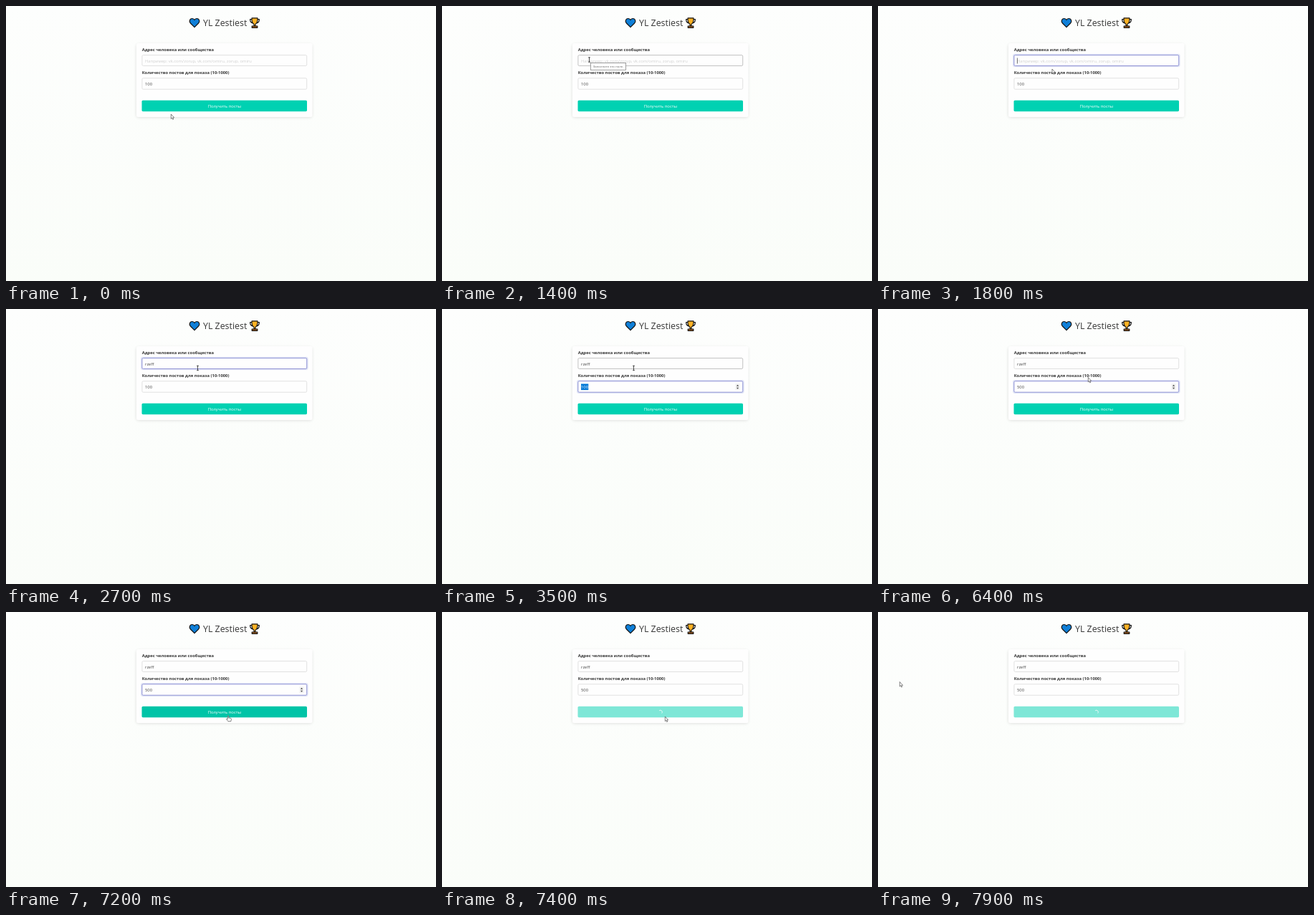
These frames come from a looping animation (600x384 px, 8 s). An HTML page:

```html
<!DOCTYPE html>
<html lang="ru">
<head>
<meta charset="utf-8">
<title>YL Zestiest</title>
<style>
html, body { margin: 0; width: 100%; height: 100%; overflow: hidden; background: #fbfdfa; }
svg { display: block; width: 600px; height: 384px; }
text { font: 5.85px "Open Sans", "Noto Sans", sans-serif; fill: #484848; white-space: pre; }
.title { font-size: 12.4px; font-weight: 500; fill: #363636; }
.label { font-weight: 700; fill: #363636; }
.hint { fill: #d0d0d0; }
.tip { font-size: 4.3px; fill: #666; }
.field { fill: #fefefe; stroke: #dedede; stroke-width: .9; }
.hot { stroke: #bcbcbc; }
.focus { stroke: #8689d2; }
.ring { fill: none; stroke: #485fc7; stroke-opacity: .16; stroke-width: 2; }
.caret { stroke: #333; stroke-width: .7; }
.ink { stroke: #151515; stroke-width: 1.2; stroke-linejoin: round; }
.pointer { fill: #fff; stroke: #444; stroke-width: .65; stroke-linejoin: round; }
</style>
</head>
<body>
<svg viewBox="0 0 600 384">
  <defs>
    <linearGradient id="sky" x2="0" y2="1"><stop stop-color="#fdfefd"/><stop offset="1" stop-color="#fafdf9"/></linearGradient>
    <filter id="soft" x="-10%" y="-20%" width="120%" height="140%"><feGaussianBlur stdDeviation="2.2"/></filter>
  </defs>
  <rect width="600" height="384" fill="url(#sky)"/>

  <path class="ink" fill="#0f7fd8" d="M263 29.7 257.4 24C254.6 20.7 257 17.4 259.9 17.5 261.6 17.6 262.6 18.6 263 19.6 263.4 18.6 264.4 17.6 266.1 17.5 269 17.4 271.4 20.7 268.6 24Z"/>
  <text class="title" x="275" y="28">YL Zestiest</text>
  <g class="ink">
    <path fill="none" d="M343.3 18.6H340.6C340.6 21.8 341.8 23.6 344.6 24M350.7 18.6H353.4C353.4 21.8 352.2 23.6 349.4 24"/>
    <path fill="#ffb224" d="M343 16.8H351C351.2 21.6 350 24.4 348 25.2V27.6H346V25.2C344 24.4 342.8 21.6 343 16.8Z"/>
    <path fill="#b5651d" d="M343.2 30.3V28H350.8V30.3Z"/>
  </g>

  <rect x="182" y="53.5" width="245" height="102" rx="3" fill="#0a0a0a" opacity=".13" filter="url(#soft)"/>
  <rect x="182" y="52" width="245.5" height="103" rx="2.5" fill="#fefefe"/>
  <text class="label" x="189.7" y="63">Адрес человека или сообщества</text>
  <text class="label" x="189.7" y="95.4">Количество постов для показа (10-1000)</text>

  <rect id="ring1" class="ring" x="189" y="67.8" width="231.6" height="16.4" rx="2.2"/>
  <rect id="box1" x="189.9" y="68.6" width="229.8" height="14.9" rx="1.6"/>
  <text id="hint" class="hint" x="194" y="78.8">Например: vk.com/zorup, vk.com/omiru, zorup, omiru</text>
  <text id="text1" x="194" y="78.8"></text>

  <rect id="ring2" class="ring" x="189" y="100" width="231.6" height="16.9" rx="2.2"/>
  <rect id="box2" x="189.9" y="100.8" width="229.8" height="15.4" rx="1.6"/>
  <rect id="mark" x="194" y="104.5" width="10.3" height="8.6" fill="#0078d7"/>
  <text id="text2" x="194" y="111.2"></text>
  <g id="steps">
    <rect x="409.5" y="104.3" width="6" height="9" fill="#f0f0f0"/>
    <path fill="#444" d="M410.9 107.8 412.5 105.8 414.1 107.8ZM410.9 109.8H414.1L412.5 111.8Z"/>
  </g>
  <path id="caret" class="caret"/>

  <g id="button">
    <rect id="face" x="189.5" y="131.8" width="230.5" height="15.4" rx="1.6"/>
    <text id="send" x="304.8" y="141.8" text-anchor="middle" style="fill:#fff">Получить посты</text>
    <path id="spin" d="M302.9 137.6A2.6 2.6 0 0 0 306.5 141.3" fill="none" stroke="#fff" stroke-width=".8"/>
  </g>

  <g id="tip">
    <rect x="207.5" y="79.5" width="49" height="9.8" fill="#fff" stroke="#858585" stroke-width=".8"/>
    <text class="tip" x="210.8" y="86">Заполните это поле.</text>
  </g>

  <g id="cursor">
    <path id="arrow" class="pointer" d="M.3 0V6.5L1.7 5.2 2.7 7.5 3.7 7 2.7 4.8H4.6Z"/>
    <path id="beam" fill="none" stroke="#222" stroke-width=".8" d="M-1.4-3.2H1.4M0-3.2V3.2M-1.4 3.2H1.4"/>
    <path id="hand" class="pointer" d="M-.7.6Q0-.4.7.6V3.2L3.8 4Q4.6 4.3 4.4 5.3L3.8 8.2H-.1L-2.4 5.2Q-2.4 4.2-1.5 4.6L-.7 5.3Z"/>
  </g>
</svg>
<script>
const $ = id => document.getElementById(id);
const LOOP = 8000, STEP = 100, BLINK = 450, LOAD = 7400;

// time, x, y
const path = [
  [0, 230, 151], [200, 224, 125], [400, 210, 88], [600, 205.5, 75], [1400, 205.5, 75],
  [1700, 232, 90], [2000, 264, 84], [2100, 267.5, 82.5], [6300, 267.5, 82.5],
  [6400, 293, 95.5], [6500, 303, 196], [6600, 303, 196], [6800, 307, 166],
  [7000, 310, 144.5], [7300, 310, 144.5], [7400, 311, 146], [7500, 312, 158],
  [7600, 215, 135], [7700, 80, 110], [7800, 16, 100], [7900, 30, 97.5]
];
// time of key press, value
const name = [[0, ""], [2100, "rz"], [2200, "rzef"], [2250, "rzeff"]];
const count = [[0, "100"], [3700, "5"], [4300, "50"], [4800, "500"]];

const last = (list, t) => list.filter(k => k[0] <= t).pop();
const show = (id, on) => $(id).style.display = on ? "" : "none";

function place(t) {
  const i = path.findIndex(p => p[0] > t);
  if (i < 0) return path[path.length - 1].slice(1);
  const [t0, x0, y0] = path[i - 1], [t1, x1, y1] = path[i];
  const k = (t - t0) / (t1 - t0);
  return [x0 + (x1 - x0) * k, y0 + (y1 - y0) * k];
}

function draw(now) {
  const t = Math.floor(now % LOOP / STEP) * STEP;
  const [x, y] = place(t);
  const inside = (top, bottom) => x > 189 && x < 420 && y > top && y < bottom;
  const loading = t >= LOAD;
  const focus = t < 1500 || loading ? 0 : t < 2900 ? 1 : 2;
  const over = !loading && inside(132, 147);
  const beam = inside(68, 84) || inside(100, 117);

  const keys = [name, count].map(list => last(list, t));
  keys.forEach(([, value], i) => {
    const n = i + 1, hot = n === 1 && t >= 1300 && t < 6400;
    $("text" + n).textContent = value;
    $("box" + n).setAttribute("class", "field " + (focus === n ? "focus" : hot ? "hot" : ""));
    show("ring" + n, focus === n);
  });
  show("hint", !keys[0][1]);
  show("steps", focus === 2);

  const marked = focus === 2 && t < 3700;
  show("mark", marked);
  $("text2").style.fill = marked ? "#fff" : "";

  show("caret", false);
  if (focus && !marked) {
    const since = t - Math.max(keys[focus - 1][0], 1500);
    const cx = 194.4 + $("text" + focus).getComputedTextLength();
    $("caret").setAttribute("d", `M${cx} ${focus === 1 ? 72.5 : 105}v8`);
    show("caret", since % (2 * BLINK) < BLINK);
  }

  $("face").setAttribute("fill", over ? "#00c4a7" : "#00d1b2");
  $("button").setAttribute("opacity", loading ? .5 : 1);
  show("send", !loading);
  show("spin", loading);
  $("spin").setAttribute("transform", `rotate(${(t - LOAD) * .72 + 180} 304.8 139.5)`);

  show("tip", t >= 800 && t < 1500);
  $("tip").setAttribute("opacity", t < 900 ? .5 : 1);

  $("cursor").setAttribute("transform", `translate(${x} ${y})`);
  show("beam", beam);
  show("hand", over);
  show("arrow", !beam && !over);
  requestAnimationFrame(draw);
}
requestAnimationFrame(draw);
</script>
</body>
</html>
```
